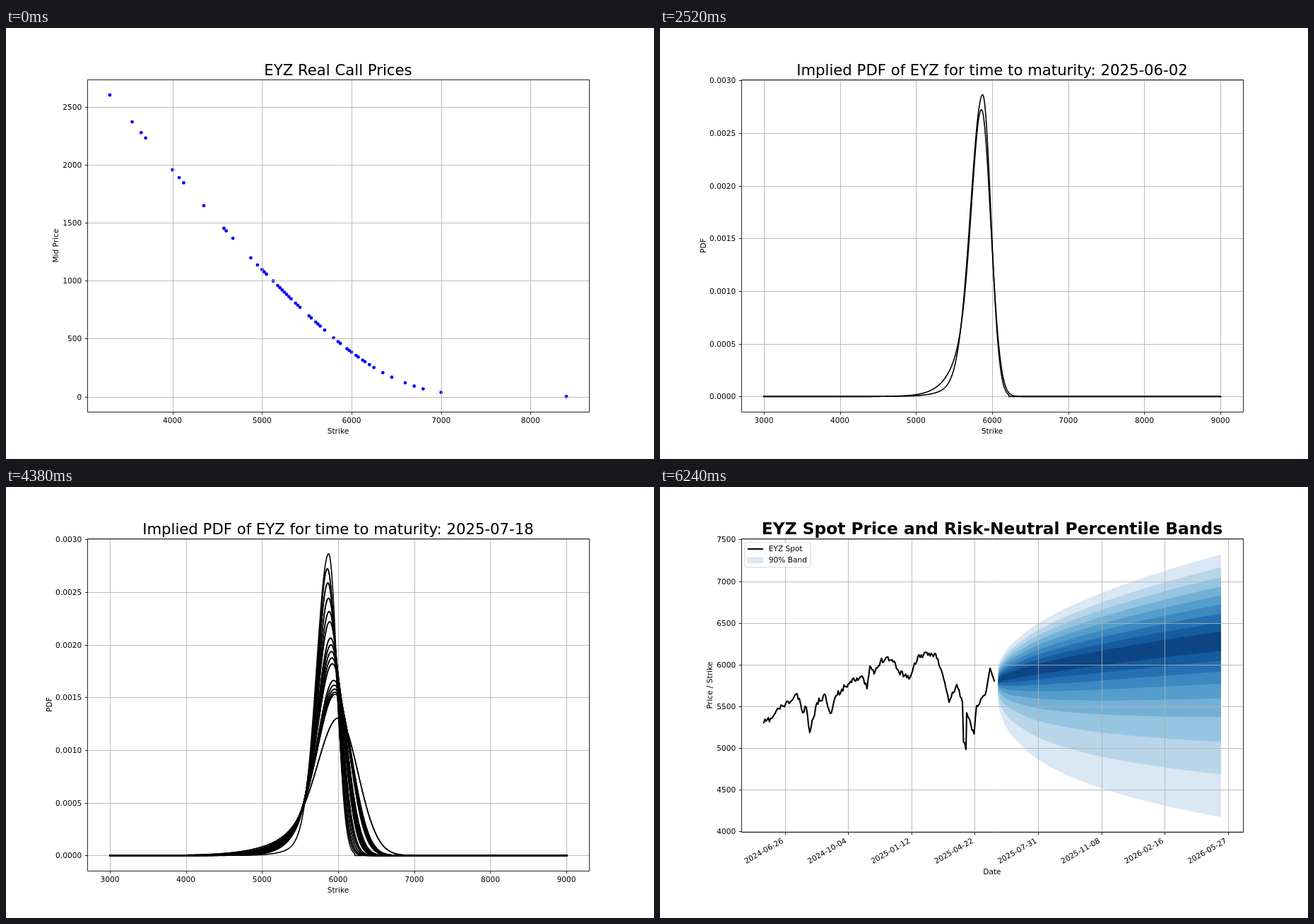
Recreate the animation shown at these times as an HTML page with a canvas. Size 917 px wide and 611 px high, loop 9.54 s.

```html
<!DOCTYPE html>
<html lang="en">
<head>
<meta charset="utf-8">
<title>Option-implied distribution</title>
<style>
  html, body { margin: 0; width: 100%; height: 100%; overflow: hidden; background: #fff; }
  canvas { display: block; }
</style>
</head>
<body>
<canvas id="stage" width="917" height="611"></canvas>
<script>
const ctx = document.getElementById('stage').getContext('2d');
const LOOP = 9540, STEP = 60, DAY = 864e5;
const PT = 917 / 12 / 72;
const FONT = '"DejaVu Sans", Verdana, sans-serif';
const BOX = { l: 114.6, r: 825.3, t: 73.3, b: 543.8 };
const MID = (BOX.l + BOX.r) / 2;
const NAME = 'EYZ';

const snap = v => Math.round(v) + 0.5;
const clamp = v => Math.max(0, Math.min(1, v));
const range = (n, f) => Array.from({ length: n }, (_, i) => f(i));
const isoDate = ms => new Date(ms).toISOString().slice(0, 10);

// Smooth Hermite curve through [x, y] points
function spline(p, x) {
  let i = 0;
  while (i < p.length - 2 && x > p[i + 1][0]) i++;
  const slope = k => {
    const a = p[Math.max(0, k - 1)], b = p[Math.min(p.length - 1, k + 1)];
    return (b[1] - a[1]) / (b[0] - a[0]);
  };
  const [x0, y0] = p[i], [x1, y1] = p[i + 1], h = x1 - x0, s = (x - x0) / h, r = 1 - s;
  return r * r * (1 + 2 * s) * y0 + s * s * (3 - 2 * s) * y1
    + h * s * r * (r * slope(i) - s * slope(i + 1));
}

function polyline(pts) {
  const path = new Path2D();
  pts.forEach(([x, y]) => path.lineTo(x, y));
  return path;
}

function text(str, x, y, { size = 10, align = 'center', angle = 0, weight = '' } = {}) {
  ctx.save();
  ctx.translate(x, y);
  ctx.rotate(angle);
  ctx.font = `${weight} ${size * PT}px ${FONT}`;
  ctx.textAlign = align;
  ctx.fillStyle = '#000';
  ctx.fillText(str, 0, 0);
  ctx.restore();
}

function stroke(path, width, color = '#000', times = 1) {
  ctx.lineWidth = width;
  ctx.strokeStyle = color;
  ctx.lineJoin = 'round';
  ctx.lineCap = 'square';
  for (let i = 0; i < times; i++) ctx.stroke(path);
}

function segment(x0, y0, x1, y1, color) {
  ctx.lineWidth = 0.85;
  ctx.strokeStyle = color;
  ctx.lineCap = 'butt';
  ctx.beginPath();
  ctx.moveTo(x0, y0);
  ctx.lineTo(x1, y1);
  ctx.stroke();
}

// Grid lies over "under" and below "over"; ticks are [label, position]
function chart({ title, bold, xlabel, ylabel, ylabelX, xticks, yticks, slanted, bottom = BOX.b, under, over }) {
  const left = snap(BOX.l), right = snap(BOX.r), top = snap(BOX.t), base = snap(bottom);
  ctx.fillStyle = '#fff';
  ctx.fillRect(0, 0, 917, 611);
  if (under) under();
  for (const [, x] of xticks) segment(snap(x), top, snap(x), base, '#b0b0b0');
  for (const [, y] of yticks) segment(left, snap(y), right, snap(y), '#b0b0b0');
  if (over) over();
  for (const [label, x] of xticks) {
    segment(snap(x), base, snap(x), base + 3.7, '#000');
    if (slanted) text(label, x - 1.2, bottom + 14.7, { align: 'right', angle: -Math.PI / 6 });
    else text(label, x, 560);
  }
  for (const [label, y] of yticks) {
    segment(left - 3.7, snap(y), left, snap(y), '#000');
    text(label, 107.2, Math.round(y + 4), { align: 'right' });
  }
  ctx.strokeStyle = '#000';
  ctx.lineWidth = 0.85;
  ctx.strokeRect(left, top, right - left, base - top);
  text(title, MID, 67, bold ? { size: 22, weight: 'bold' } : { size: 20 });
  text(xlabel, MID, slanted ? 549 : 575);
  text(ylabel, ylabelX, (BOX.t + bottom) / 2, { angle: -Math.PI / 2 });
}

// ---- Prices and volatilities by strike ----
// Runs of strikes 25 apart in the liquid middle, single ones elsewhere
const runs = [[5000, 3], [5175, 7], [5375, 3], [5525, 2], [5600, 3], [5850, 2], [5950, 3], [6050, 2], [6125, 2]];
const strikes = [
  3300, 3550, 3650, 3700, 4000, 4075, 4125, 4350, 4575, 4600, 4675, 4875, 4950, 5125,
  5700, 5800, 6200, 6250, 6350, 6450, 6600, 6700, 6800, 7000, 8400,
  ...runs.flatMap(([first, n]) => range(n, i => first + 25 * i))
];
const strikeX = k => 146.9 + (k - 3300) * 0.12669;
const strikeTicks = range(5, i => [String(4000 + 1000 * i), strikeX(4000 + 1000 * i)]);

const callCurve = [[3300, 95], [4000, 201], [4575, 284], [5000, 342.5], [5550, 411], [6000, 459.5],
  [6450, 495], [7000, 516.5], [8400, 522.5]];
const ivCurve = [[3300, 95], [3700, 158], [4125, 217], [4600, 273], [5000, 315.5], [5400, 355.5],
  [6000, 423.5], [6450, 471.5], [6800, 499.5], [7000, 509.5], [8400, 500.5]];
const fitCurve = [[3300, 112], [4000, 193], [5000, 318], [6000, 426], [7000, 502], [7780, 522], [8400, 507]];
const fitLine = polyline(range(205, i => 3300 + 25 * i).map(k => [strikeX(k), spline(fitCurve, k)]));

function dots(curve, color, times) {
  ctx.fillStyle = color;
  for (let n = 0; n < times; n++) {
    for (const k of strikes) {
      ctx.beginPath();
      ctx.arc(strikeX(k), spline(curve, k), 2.4, 0, 2 * Math.PI);
      ctx.fill();
    }
  }
}

function drawCalls(times) {
  chart({
    title: `${NAME} Real Call Prices`, xlabel: 'Strike', ylabel: 'Mid Price', ylabelX: 74,
    xticks: strikeTicks,
    yticks: range(6, i => [String(500 * i), 522.5 - 82.15 * i]),
    under: () => dots(callCurve, '#00f', times)
  });
}

function drawVol(fitted, times) {
  chart({
    title: `${NAME} ${fitted ? 'Fitted' : 'Real'} Implied Volatility`,
    xlabel: 'Strike', ylabel: 'IV', ylabelX: 77,
    xticks: strikeTicks,
    yticks: range(5, i => [(0.15 + 0.05 * i).toFixed(2), 477.2 - 84.95 * i]),
    under: () => dots(ivCurve, '#f00', times),
    over: () => fitted && stroke(fitLine, 1.8, '#f00', times)
  });
}

// ---- Expiries: sixteen weekdays, then third Fridays and some month ends ----
const START = Date.UTC(2025, 4, 30);
const weekday = ms => new Date(ms).getUTCDay();
const isWorkday = ms => weekday(ms) % 6 !== 0;

const expiries = range(22, i => START + i * DAY).filter(isWorkday);
for (let m = 6; m <= 16; m++) {
  const first = Date.UTC(2025, m, 1);
  expiries.push(first + ((12 - weekday(first)) % 7 + 14) * DAY);
  if (m < 10 || m === 11) {
    let end = Date.UTC(2025, m + 1, 0);
    while (!isWorkday(end)) end -= DAY;
    expiries.push(end);
  }
}
const daysTo = ms => (ms - START) / DAY;

// ---- Densities ----
const ZERO = 522.4, UNIT = 149.4, AREA = 16098;
// Days to expiry against the inverse square of the peak (in thousandths)
const spread = [[0, 0.122], [3, 0.135], [7, 0.203], [10, 0.235], [14, 0.302], [21, 0.427], [49, 0.587],
  [62, 0.81], [77, 1], [112, 1.45], [175, 2.44], [350, 4.72]];

// Left side: narrow core plus heavy tail; right side: steep fall. Area is kept constant.
function densityPath(expiry, i) {
  const width = Math.sqrt(spline(spread, daysTo(expiry)));
  const height = UNIT * 1 / width, a = AREA / (height * 1);
  return buildDensity(width, height, a, i === 0);
}

function buildDensity(width, height, area, first) {
  const late = clamp((area - 83) / 86), q = 2 + 0.5 * late;
  const mode = (first ? 443 : 440.5) + 39 * width;
  const fall = (first ? 0.435 : 0.472) * area, cut = first ? 37 : Infinity;
  const w = first ? 0.15 : 0.42 + 0.1 * late;
  const core = (first ? 0.45 : 0.33) * area;
  const tail = (area - 0.886 * fall - (1 - w) * 1.2533 * core) / (1.55 * w);
  const shape = d => {
    if (d > cut) return 0;
    if (d > 0) return Math.exp(-((d / fall) ** q));
    return (1 - w) * Math.exp(-d * d / (2 * core * core))
      + w * Math.exp(-1.5 * (Math.sqrt(1 + d * d / (1.5 * tail * tail)) - 1));
  };
  return polyline(range(1294, i => {
    const x = 146.9 + i * 0.5;
    return [x, ZERO - height * shape(x - mode)];
  }));
}
const densities = expiries.map(densityPath);

// Every expiry after the first is plotted twice, one stroke per step
function drawDensities(strokes) {
  const last = Math.ceil(strokes / 2);
  chart({
    title: `Implied PDF of ${NAME} for time to maturity: ${isoDate(expiries[last])}`,
    xlabel: 'Strike', ylabel: 'PDF', ylabelX: 64.5,
    xticks: range(7, i => [String(3000 + 1000 * i), 146.9 + 107.7 * i]),
    yticks: range(7, i => [(0.0005 * i).toFixed(4), ZERO - 74.7 * i]),
    over: () => {
      for (let i = 0; i <= last; i++) {
        stroke(densities[i], 1.6, '#000', i === 0 ? 1 : Math.min(2, strokes - 2 * (i - 1)));
      }
    }
  });
}

// ---- Spot history: key turns joined by a seeded daily jitter ----
const spotTurns = [[147, 334], [158, 328], [168, 314], [186, 303], [194, 293], [202, 320], [207, 312],
  [212, 348], [222, 306], [234, 295], [241, 321], [249, 296], [262, 283], [274, 271], [288, 272],
  [293, 286], [297, 254], [303, 265], [312, 247], [321, 241], [333, 250], [338, 262], [354, 270],
  [365, 240], [390, 236], [403, 277], [409, 305], [420, 280], [428, 305], [429.5, 361], [433, 372],
  [434, 320], [444.5, 350], [448, 310], [460, 295], [467, 257], [473, 275]];

function roughen(turns) {
  let seed = 11;
  const rand = () => (seed = seed * 16807 % 2147483647) / 2147483647 - 0.5;
  const out = [turns[0]];
  for (let i = 1; i < turns.length; i++) {
    const [x0, y0] = turns[i - 1], [x1, y1] = turns[i];
    const n = Math.max(1, Math.round((x1 - x0) / 1.6));
    for (let k = 1; k <= n; k++) {
      out.push([x0 + (x1 - x0) * k / n, y0 + (y1 - y0) * k / n + (k < n ? 8 * rand() : 0)]);
    }
  }
  return out;
}
const spot = polyline(roughen(spotTurns));

// ---- Percentile bands: a drifting median with power-law spreads ----
const blues = ['#dae8f4', '#b9d5e9', '#95c5e0', '#74b0d6', '#559dcb', '#3c88c0', '#2570b3', '#165b9f', '#0e4584'];
const fan = expiries.map(e => {
  const d = daysTo(e) * 0.8985;
  return {
    x: 479 + d,
    median: 274 - 56 * (d / 314) ** 0.73,
    up: 59 * ((d + 3) / 47) ** 0.38,
    down: 116.5 * ((d + 2) / 46) ** 0.395
  };
});
const bands = blues.map((_, i) => {
  const k = 1 - i / 9;
  const up = 0.94 * k + 0.06 * k ** 12, down = 0.5 * k + 0.5 * k ** 4;
  const path = polyline([
    ...fan.map(p => [p.x, p.median - p.up * up]),
    ...fan.map(p => [p.x, p.median + p.down * down]).reverse()
  ]);
  path.closePath();
  return path;
});

function drawLegend() {
  ctx.beginPath();
  ctx.roundRect(120, 78.8, 93, 35.2, 2.2);
  ctx.fillStyle = 'rgba(255,255,255,.8)';
  ctx.fill();
  ctx.lineWidth = 1;
  ctx.strokeStyle = 'rgba(204,204,204,.8)';
  ctx.stroke();
  stroke(polyline([[125, 87.8], [145, 87.8]]), 2.1);
  ctx.fillStyle = blues[0];
  ctx.fillRect(124.5, 100, 21.2, 7.4);
  ctx.lineWidth = 0.8;
  ctx.strokeStyle = '#cfe0f0';
  ctx.strokeRect(124.5, 100, 21.2, 7.4);
  text(`${NAME} Spot`, 153.7, 91.4, { align: 'left' });
  text('90% Band', 153.7, 107.4, { align: 'left' });
}

function drawFan() {
  chart({
    title: `${NAME} Spot Price and Risk-Neutral Percentile Bands`, bold: true,
    xlabel: 'Date', ylabel: 'Price / Strike', ylabelX: 74,
    slanted: true, bottom: 488.8,
    xticks: range(8, i => [isoDate(Date.UTC(2024, 5, 26 + 100 * i)), 176.5 + 89.63 * i]),
    yticks: range(8, i => [String(4000 + 500 * i), 488.4 - 59.13 * i]),
    under: () => bands.forEach((band, i) => {
      ctx.fillStyle = blues[i];
      ctx.fill(band);
      stroke(band, 0.8, blues[i]);
    }),
    over: () => {
      stroke(spot, 2.1);
      drawLegend();
    }
  });
}

function draw(n) {
  if (n < 10) drawCalls(n + 1);
  else if (n < 21) drawVol(false, 1);
  else if (n < 31) drawVol(true, n - 20);
  else if (n < 42) drawDensities(0);
  else if (n < 104) drawDensities(n - 41);
  else drawFan();
}

const start = performance.now();
let shown = -1;
function tick() {
  const n = Math.min(104, Math.floor((performance.now() - start) % LOOP / STEP));
  if (n !== shown) draw(shown = n);
  requestAnimationFrame(tick);
}
tick();
</script>
</body>
</html>
```
